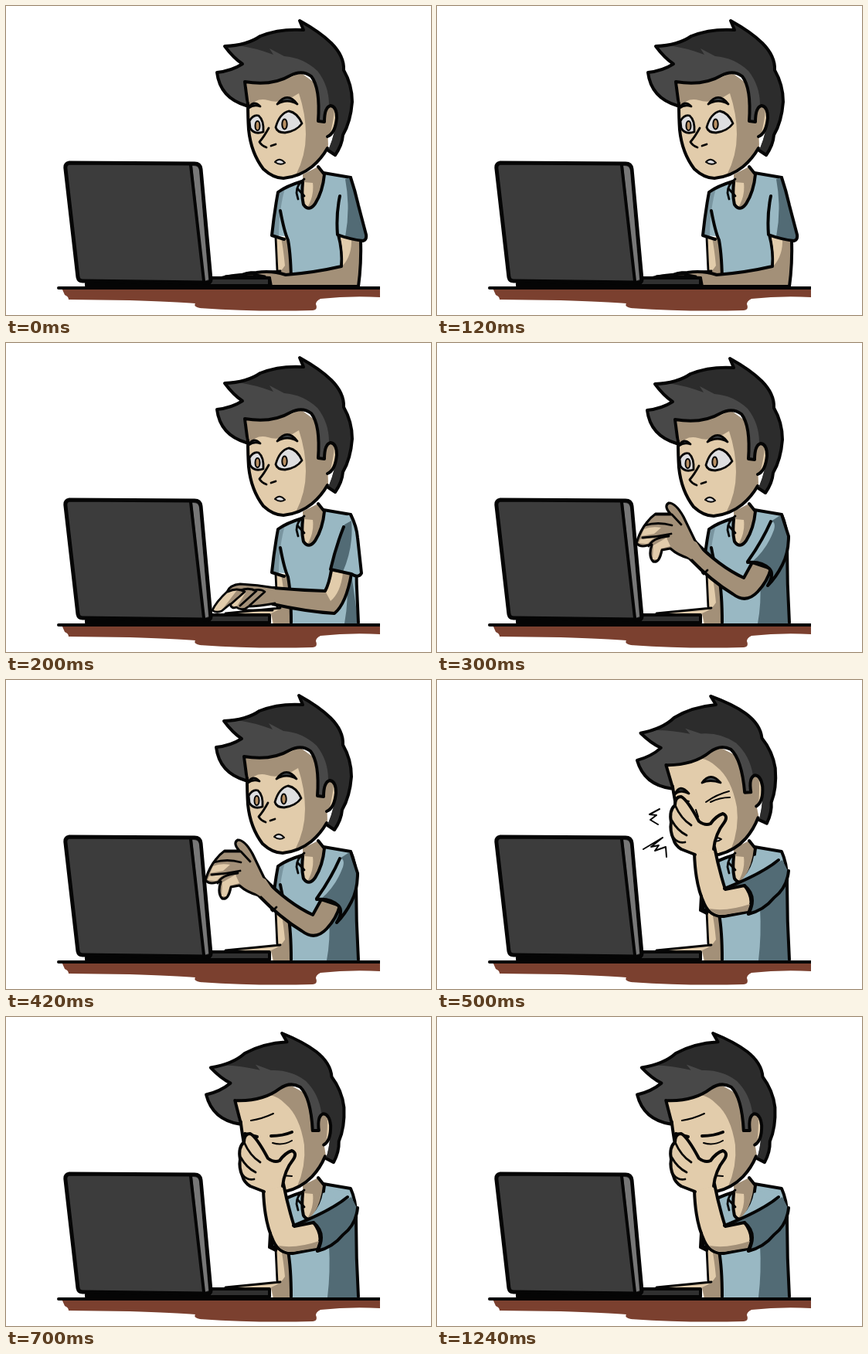
Animation, 550 px wide and 400 px high, one loop 1.6 s. Source, as an HTML page:

```html
<!DOCTYPE html>
<html lang="en">
<head>
<meta charset="utf-8">
<title>Facepalm at the laptop</title>
<style>
html, body { margin: 0; width: 100%; height: 100%; overflow: hidden; background: #fff; }
svg { display: block; width: 100vw; height: 100vh; }
path, ellipse { fill: none; stroke-linejoin: round; stroke-linecap: round; }
.o { stroke: #050505; stroke-width: 4; }
.t { stroke: #050505; stroke-width: 2.8; }
.h { stroke: #050505; stroke-width: 2; }
.light { fill: #e2ccab; }
.dark { fill: #a39078; }
.shirt { fill: #99b8c3; }
.shade { fill: #526b75; }
.hair { fill: #484848; }
.night { fill: #2c2c2c; }
.eye { fill: #dedee0; }
.iris { fill: #b99165; }
.brow { fill: #4b5358; }
</style>
</head>
<body>
<svg viewBox="0 0 550 400">
  <!-- table -->
  <path fill="#7b402f" style="fill:#7b402f" d="M72 365H484V377Q444 375 407 379Q401 382 401 386Q404 393 397 394Q320 396 251 391Q242 389 245 385Q220 383 160 381L81 380Q81 376 76 374Z"/>

  <!-- torso -->
  <path class="shirt" d="M352 241L383 227L405 215L446 222L453 250Q454 300 456 363H369Q370 320 362 298L344 297Q347 262 352 241Z"/>
  <path class="shade" data-at="1" d="M447 299L456 363H438Q444 330 440 305Z"/>
  <path class="shade" data-at="2" d="M418 310L453 275L456 363H415Q420 336 418 310Z"/>
  <path class="shade" data-at="3 4" d="M418 295L453 255L456 363H416Q420 330 418 295Z"/>
  <path class="shade" d="M352 241L361 236Q353 264 353 299L344 297Q347 262 352 241Z" opacity=".45"/>

  <!-- resting arm -->
  <g>
    <path class="light" d="M349 300L351 344L284 350L343 351L345 363H369Q370 320 362 299Z"/>
    <path class="dark" d="M356 300L362 300Q370 320 369 363H346L343 350Q356 345 361 336Q359 315 356 300Z"/>
    <path class="t" d="M349 300L351 343M284 350L325 346L355 343"/>
  </g>
  <path class="o" d="M383 227Q363 233 352 241Q347 268 344 297L360 302M355 265Q360 292 365 303Q369 325 369 362"/>
  <path class="o" data-at="1 2 3 4" d="M405 215L446 222Q454 240 453 262Q453 312 456 362"/>
  <path class="o" data-at="0" d="M405 215L446 222"/>

  <!-- neck -->
  <path class="dark" d="M384 218L406 207L411 220Q409 240 399 256Q391 267 385 256Z"/>
  <path class="light" d="M386 228L397 229Q399 244 391 259Q386 260 385 252Z"/>
  <path class="o" d="M404 208L412 218Q410 240 400 256Q392 267 385 257Q382 245 384 228"/>
  <path class="t" d="M386 224Q376 231 376 242L378 250M377 236L386 246"/>

  <!-- head -->
  <g id="head">
    <path class="light" d="M311 98Q314 130 314 160Q317 190 333 211Q346 223 359 223Q380 221 396 208Q410 196 417 184L414 110L380 86Z"/>
    <path class="dark" d="M311 98Q348 106 381 86L414 110L417 184Q402 211 375 219Q388 194 388 166Q388 140 379 113Q356 128 339 122Q324 118 314 131Z" data-at="0 1 2"/>
    <path class="dark" d="M356 97L381 86L414 110L417 184Q402 211 375 219Q390 194 391 166Q390 128 373 110Q365 100 356 97Z" data-at="3 4"/>
    <path class="o" d="M313 126Q313 145 314 160Q317 190 333 211Q346 223 359 223Q380 221 396 208Q408 198 416 184"/>
    <path class="hair" d="M311 129Q277 119 273 86Q292 84 306 75Q294 67 283 52Q312 51 329 39Q354 29 385 31L380 19Q407 34 421 48Q438 65 437 83Q448 102 448 124Q446 150 436 167Q435 180 426 193L417 187Q428 160 428 139Q428 130 420 129Q413 131 412 150L404 149Q407 106 395 91Q383 82 368 90Q344 104 309 98Z"/>
    <path class="night" d="M300 51Q320 48 329 39Q354 29 385 31L380 19Q407 34 421 48Q438 65 437 83Q448 102 448 124Q446 150 436 167Q435 180 426 193L417 187Q428 160 428 139Q427 129 418 128Q418 103 403 84Q385 67 360 65L341 55L346 63Q322 54 300 51Z"/>
    <path class="dark" d="M413 150Q412 130 421 129Q429 130 428 145Q426 165 416 169Z"/>
    <path class="light" d="M420 164Q424 147 425 134Q430 150 420 164Z"/>
    <path class="o" d="M311 129Q277 119 273 86Q292 84 306 75Q294 67 283 52Q312 51 329 39Q354 29 385 31L380 19Q407 34 421 48Q438 65 437 83Q448 102 448 124Q446 150 436 167Q435 180 426 193L417 187M309 98Q344 104 368 90Q383 82 395 91Q407 106 404 149L412 150Q412 131 420 129Q428 130 428 145Q426 165 416 169M309 98L313 129"/>

    <g data-at="0 1 2">
      <path class="eye t" d="M315 149Q320 140 327 142Q334 148 333 163Q321 167 316 158Z"/>
      <path class="eye t" d="M349 157Q354 139 366 136Q377 138 383 152Q376 162 361 164Q351 164 349 157Z"/>
      <ellipse class="iris h" cx="325.500" cy="155" rx="3" ry="6"/>
      <ellipse class="iris h" cx="360.500" cy="153" rx="3.200" ry="6.500"/>
      <path class="brow t" d="M314 132Q320 121 329 130Q321 127 314 132Z"/>
      <path class="brow t" d="M351 127Q364 110 377 127Q364 119 351 127Z"/>
      <path class="t" d="M340 158Q334 169 328 176Q331 181 337 183M343 181L349 179"/>
      <path class="eye h" d="M348 202Q354 195 361 203Q355 207 348 202Z"/>
    </g>
  </g>

  <!-- wincing face -->
  <g data-at="3">
    <path class="brow t" d="M308 148Q314 133 326 147Q315 141 308 148Z"/>
    <path class="brow t" d="M343 133Q354 118 367 133Q353 128 343 133Z"/>
    <path class="h" d="M348 158Q362 148 378 144M354 158Q366 152 379 152M309 153L326 157M335 168L338 177"/>
    <path class="eye h" d="M355 207Q362 202 368 206Q362 211 355 207Z"/>
    <path class="h" d="M288 167L275 174L284 175L276 181L286 187M267 219L292 204L277 216L287 214L282 221L296 216L297 229"/>
  </g>

  <!-- weary face -->
  <g data-at="4">
    <path class="h" d="M317 134Q331 132 346 125M345 163Q358 167 370 160M357 205L370 206"/>
    <path class="o" d="M343 154Q358 154 370 149M309 151L325 155"/>
  </g>

  <!-- typing arm, low -->
  <g data-at="0">
    <path class="dark o" d="M430 296Q436 318 434 337Q400 345 362 348Q344 342 324 345Q309 345 303 350L341 352L343 363H456Q460 335 459 300Z"/>
    <path class="light" d="M433 300L447 301Q448 322 436 336Q437 320 433 300Z"/>
    <path class="t" d="M276 352Q296 347 318 347L335 350"/>
    <path class="shirt" d="M446 222Q452 240 456 258L466 296Q467 303 462 304Q445 302 429 296Q426 265 433 232Z"/>
    <path class="shade" d="M439 224L446 222L456 258L466 296L462 304L439 299Q446 262 439 224Z"/>
    <path class="o" d="M446 222Q452 240 456 258L466 296Q467 303 462 304Q445 302 429 296Q427 270 432 246"/>
  </g>

  <!-- laptop -->
  <path class="o" style="fill:#303030" d="M104 359H263L266 352H341V362H104Z"/>
  <path class="o" style="fill:#3c3c3c;stroke-width:5" d="M82 203L244 204Q251 204 252 211L265 354Q265 358 260 358L99 356Q94 356 93 351L77 211Q76 204 82 203Z"/>
  <path style="fill:#777" d="M241 207Q249 206 250 213L262 354L257 356Z"/>
  <path class="o" d="M239 206L256 356"/>
  <path class="o" d="M68 365H482"/>
  <path class="o" style="stroke-linecap:butt" d="M470 365H484"/>

  <!-- typing arm, fingers up -->
  <g data-at="1">
    <path class="dark" d="M421 294Q418 312 413 321Q380 320 346 317L345 338Q390 348 425 350Q440 338 447 299Z"/>
    <path class="light" d="M423 296L436 298Q433 323 420 334L413 321Q420 311 423 296Z"/>
    <path class="o" d="M421 294Q418 312 413 321Q380 320 346 317M345 338Q390 348 425 350Q440 338 447 299"/>
    <path class="dark" d="M348 317Q325 313 303 312Q290 313 286 322Q272 335 267 346Q272 350 279 347L290 338Q292 345 298 342Q306 348 314 341Q326 341 348 337Z"/>
    <path class="light" d="M287 322L299 320L279 346Q272 350 267 346Q275 331 287 322ZM301 327L311 322L298 342L291 339Z"/>
    <path class="t" d="M348 317Q325 313 303 312Q290 313 286 322Q272 335 267 346Q272 350 279 347L290 338Q292 345 298 342Q306 348 314 341Q326 341 348 337M287 322Q299 316 309 322L291 338M303 320Q315 316 324 321L303 340M320 320Q330 318 335 322L315 340M307 346L345 346"/>
    <path class="shirt" d="M446 222L455 250L460 298Q456 305 447 299L420 293Q430 265 434 226Z"/>
    <path class="shade" d="M438 235Q430 263 421 292L436 296Q450 264 447 230Z"/>
    <path class="o" d="M446 222Q454 238 455 252L460 298Q456 305 447 299L420 293Q427 263 437 238"/>
  </g>

  <!-- arm lifting -->
  <g data-at="2">
    <path class="dark o" d="M334 257Q365 289 397 304L408 284L432 292Q428 308 415 322Q400 338 383 325Q355 308 327 279Z"/>
    <path class="dark o" style="stroke-width:3.200" d="M335 258L319 225Q309 207 300 207Q293 211 302 221L283 221Q276 226 271 233Q263 243 258 259Q263 265 272 262L278 261Q273 276 280 283Q288 285 291 268L302 266Q312 275 327 279"/>
    <path class="dark" d="M320 250L336 258L344 270L329 280L312 269Z"/>
    <path class="light" d="M268 241Q277 237 290 239L281 247L264 250ZM263 254L281 252L272 260L261 259ZM280 262L297 252L302 263L290 266L285 280L279 280Z"/>
    <path class="t" d="M283 222L304 222L316 235M269 236Q286 231 304 236M266 252Q284 251 303 247M274 263Q279 252 300 250"/>
    <path class="t" d="M340 291L345 299L350 294"/>
    <path class="shade" d="M446 222L455 250Q455 272 447 287Q439 303 428 312Q436 299 430 292Q420 282 402 284Q422 260 432 231Z"/>
    <path class="shirt" d="M419 252L432 231Q439 231 436 242Q427 267 408 283L402 284Z"/>
    <path class="o" d="M446 222L455 250Q455 272 447 287Q439 303 428 314Q437 299 430 292Q420 282 402 284M402 283Q420 258 432 231"/>
  </g>

  <!-- hand on face -->
  <g data-at="3 4">
    <path class="shade" d="M447 233L400 259L373 270L403 303Q421 297 434 284Q451 268 454 247Z"/>
    <path class="shirt" d="M410 228Q424 223 428 232Q422 247 404 257L390 263Q407 247 410 228Z"/>
    <path class="light o" d="M333 223Q334 265 346 290Q354 307 371 306L403 300Q412 284 398 266L373 271Q365 246 359 216Z"/>
    <path class="dark" d="M352 296Q376 300 405 290L402 299L371 304Q358 304 352 296Z"/>
    <path class="shade" d="M398 266Q415 277 403 303Q425 298 437 280L420 256Z"/>
    <path class="o" d="M442 233Q420 251 372 270M398 266Q415 280 403 303Q423 298 436 282Q453 269 455 247"/>
    <path class="light" d="M334 226L316 219Q308 214 306 206Q301 195 303 184Q300 169 308 162Q308 151 316 151Q324 155 339 183L354 186Q361 176 370 173Q377 176 372 184Q360 199 358 219Z"/>
    <path class="o" d="M334 226L316 219Q308 214 306 206Q301 195 303 184Q300 169 308 162Q308 151 316 151Q324 155 339 183Q347 189 354 186Q361 176 370 173Q377 176 372 184Q360 199 358 219"/>
    <path class="t" d="M308 162Q316 180 329 188M304 182Q311 195 323 201M306 204Q312 212 321 210"/>
    <path class="o" d="M342 280L341 298L349 302"/>
  </g>
</svg>
<script>
const starts = [0, 200, 300, 500, 700], loop = 1600;
// tip of the hair and tilt for each pose
const tilts = [[380, 18, 0], [380, 18, 0], [379, 19, 0], [354, 20, -9], [357, 20, -7]];
const head = document.getElementById('head');
const parts = [...document.querySelectorAll('[data-at]')].map(el => [el, el.dataset.at.split(' ').map(Number)]);
let shown = -1;

function draw(ms) {
  const pose = starts.findLastIndex(s => s <= ms % loop);
  if (pose === shown) return;
  shown = pose;
  for (const [el, at] of parts) el.style.display = at.includes(pose) ? '' : 'none';
  const [x, y, angle] = tilts[pose];
  head.setAttribute('transform', `translate(${x} ${y}) rotate(${angle}) translate(-380 -18)`);
}

const began = performance.now();
function tick() {
  draw(performance.now() - began);
  requestAnimationFrame(tick);
}
tick();
</script>
</body>
</html>
```
